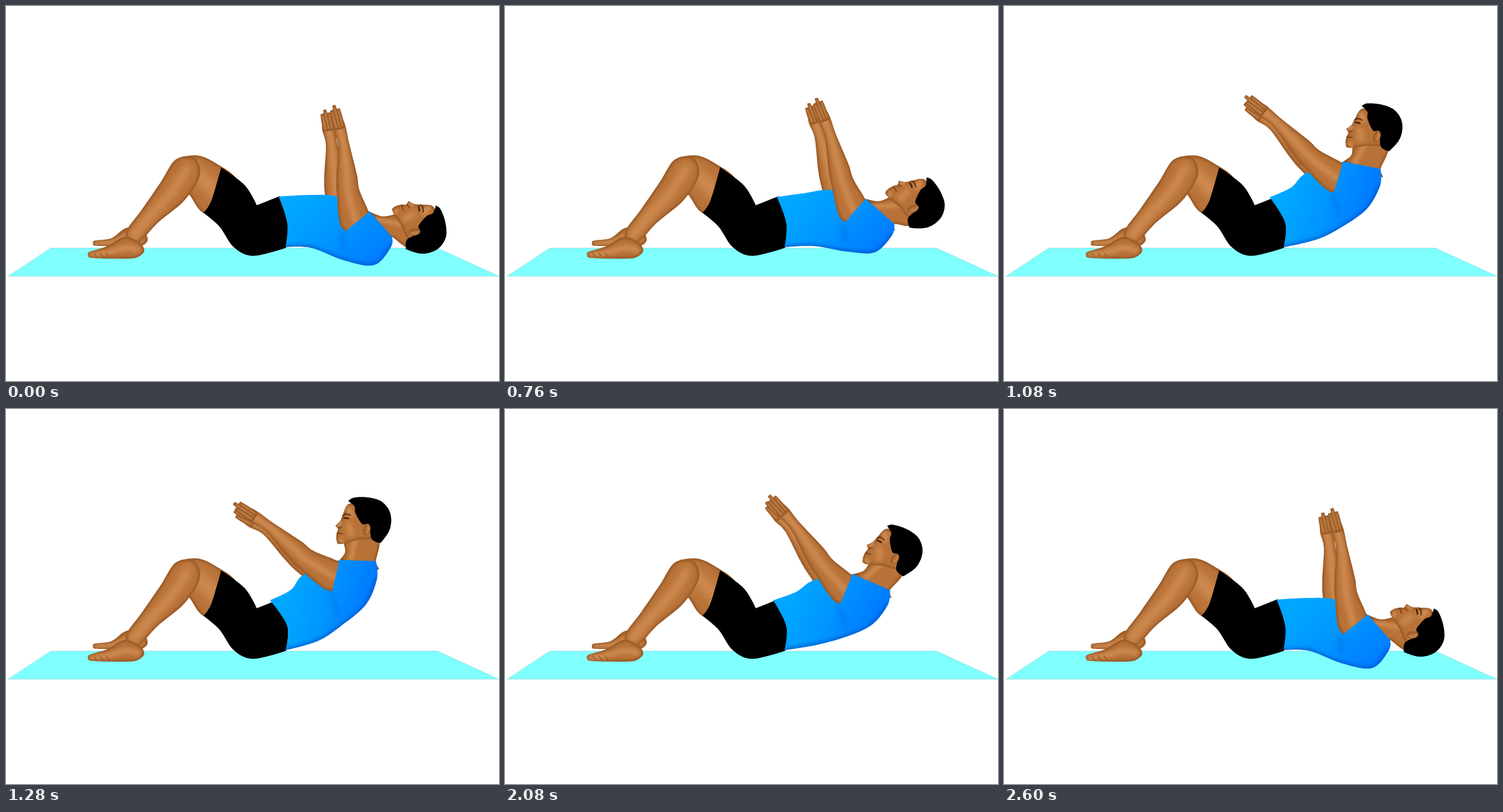
Recreate the animation shown at these times as an HTML page with a canvas. Size 857 px wide and 653 px high, loop 2.64 s.

```html
<!DOCTYPE html>
<html lang="en">
<head>
<meta charset="utf-8">
<title>Sit-up</title>
<style>
html, body { margin: 0; width: 100%; height: 100%; overflow: hidden; background: #fff; }
canvas { display: block; }
</style>
</head>
<body>
<canvas id="stage" width="857" height="653"></canvas>
<script>
const ctx = document.getElementById('stage').getContext('2d');
const LOOP = 2640, STEP = 40, MIDWAY = 0.536;
const SKIN = '#b87238', DARK = '#6e3a10', LIGHT = '#e6a66c';

// Joints: place when lying, midway and sitting
const JOINTS = {
  sleeve: [[585, 396], [583, 354], [566, 320]],
  shoulder: [[608, 378], [599, 328], [574, 294]],
  elbow: [[595, 325], [565, 283], [524, 264]],
  wrist: [[587, 242], [521, 208], [458, 206]],
  tip: [[570, 173], [480, 150], [396, 164]],
  ear: [[711, 393], [690, 281], [627, 209]],
  tilt: [[72], [28], [0]],
  waist: [[474, 332], [468, 333], [459, 333]],
  loin: [[530, 421], [545, 412], [542, 404]],
  back: [[588, 443], [600, 402], [582, 378]],
  blade: [[640, 451], [642, 387], [626, 340]],
  outer: [[669, 420], [670, 355], [645, 295]],
  nape: [[671, 402], [674, 332], [643, 265]],
  collar: [[632, 358], [611, 298], [580, 263]],
  chest: [[577, 332], [546, 302], [518, 288]],
  belly: [[528, 329], [510, 320], [495, 315]]
};

const mix = (a, b, f) => a.map((v, i) => v + (b[i] - v) * f);
const shift = (a, b) => [a[0] + b[0], a[1] + b[1]];

// Parabola through the three places
function along([a, b, c], p) {
  const wa = (p - MIDWAY) * (p - 1) / MIDWAY;
  const wb = p * (p - 1) / (MIDWAY * (MIDWAY - 1));
  const wc = p * (p - MIDWAY) / (1 - MIDWAY);
  return a.map((v, i) => v * wa + b[i] * wb + c[i] * wc);
}

function curve(pts, sharp = [], closed = true) {
  const n = pts.length, path = new Path2D();
  const at = i => closed ? pts[(i + n) % n] : pts[Math.max(0, Math.min(n - 1, i))];
  const slope = (i, k) => sharp.includes(i % n) ? 0 : (at(i + 1)[k] - at(i - 1)[k]) / 6;
  path.moveTo(...pts[0]);
  for (let i = 0; i < (closed ? n : n - 1); i++) {
    const a = at(i), b = at(i + 1);
    path.bezierCurveTo(a[0] + slope(i, 0), a[1] + slope(i, 1),
      b[0] - slope(i + 1, 0), b[1] - slope(i + 1, 1), b[0], b[1]);
  }
  if (closed) path.closePath();
  return path;
}
const thread = (...pts) => curve(pts, [], false);

function line(path, color, width, blur = 0, alpha = 1) {
  ctx.save();
  ctx.filter = blur ? `blur(${blur}px)` : 'none';
  ctx.globalAlpha = alpha;
  ctx.strokeStyle = color;
  ctx.lineWidth = width;
  ctx.lineCap = ctx.lineJoin = 'round';
  ctx.stroke(path);
  ctx.restore();
}

function fill(path, color) {
  ctx.fillStyle = color;
  ctx.fill(path);
}

// Skin with a dark rim and soft strokes, all kept inside the outline
function skin(path, ...shades) {
  fill(path, SKIN);
  ctx.save();
  ctx.clip(path);
  line(path, DARK, 4, 2.5, 0.7);
  for (const shade of shades) line(...shade);
  ctx.restore();
}

// Rounded limb along points [x, y, half width]
function limb(...pts) {
  const left = [], right = [], caps = [];
  pts.forEach(([x, y, r], i) => {
    const a = pts[Math.max(i - 1, 0)], b = pts[Math.min(i + 1, pts.length - 1)];
    const len = Math.hypot(b[0] - a[0], b[1] - a[1]);
    const dx = (b[0] - a[0]) / len * r, dy = (b[1] - a[1]) / len * r;
    left.push([x + dy, y - dx]);
    right.unshift([x - dy, y + dx]);
    if (i === 0) caps.push([x - dx * 0.8, y - dy * 0.8]);
    if (i === pts.length - 1) caps.push([x + dx * 0.8, y + dy * 0.8]);
  });
  const girth = pts.reduce((s, q) => s + q[2], 0) / pts.length;
  skin(curve([caps[0], ...left, caps[1], ...right]),
    [thread(...pts), LIGHT, girth * 0.6, girth * 0.3, 0.6]);
}

function mat() {
  const edge = new Path2D('M78 421.5L750 421.5L857 470.5L4 470.5Z');
  fill(edge, '#80ffff');
  line(edge, '#8fd0d0', 0.6);
}

function legs() {
  limb([236, 406, 13], [212, 401, 15], [185, 411, 7], [155, 413, 4.5]);
  limb([316, 282, 27], [343, 302, 36], [374, 333, 40]);
  limb([316, 281, 25], [290, 322, 26], [250, 366, 18], [221, 401, 15]);
  limb([230, 425, 13], [208, 421, 19], [178, 429, 11], [147, 433, 5.5]);
  for (let x = 152; x < 185; x += 11) line(thread([x, 430], [x + 5, 436]), DARK, 1.2, 0, 0.6);
  fill(curve([[374, 281], [415, 312], [436, 347], [476, 331], [490, 382], [487, 421], [430, 435],
    [396, 420], [371, 384], [343, 360], [357, 339]], [0, 2, 3, 5, 9]), '#000');
}

function arm(shoulder, elbow, wrist, tip) {
  const palm = mix(wrist, tip, 0.45);
  limb([...shoulder, 26], [...elbow, 20], [...mix(elbow, wrist, 0.35), 18], [...wrist, 10],
    [...palm, 11], [...mix(wrist, tip, 0.65), 8]);
  const len = Math.hypot(tip[0] - wrist[0], tip[1] - wrist[1]);
  const side = [(wrist[1] - tip[1]) / len, (tip[0] - wrist[0]) / len];
  for (let i = 1; i >= -1; i--) {
    const off = r => [side[0] * i * r, side[1] * i * r];
    const end = mix(wrist, tip, 0.96 - 0.1 * Math.abs(i));
    limb([...shift(palm, off(5)), 4.5], [...shift(end, off(6)), 3]);
  }
}

// Head in its own frame, with the ear at the centre
function head([x, y], tilt) {
  ctx.save();
  ctx.translate(x, y);
  ctx.rotate(tilt * Math.PI / 180);
  ctx.scale(0.97, 0.97);
  skin(curve([[-30, -46], [-43, -25], [-47, -15], [-56, -6], [-51, 0], [-54, 9], [-54, 20], [-48, 27],
    [-18, 20], [14, 12], [10, -35]], [3, 4]),
    [thread([-34, -37], [-27, -25]), LIGHT, 8, 3, 0.6],
    [thread([-46, -12], [-52, -6]), LIGHT, 4, 1.5, 0.7],
    [thread([-32, -8], [-27, 10]), LIGHT, 10, 4, 0.5],
    [thread([-48, 20], [-42, 23]), LIGHT, 5, 2, 0.6],
    [thread([-44, -24], [-37, -27], [-29, -25]), '#3c1c06', 2, 0.6, 0.8],
    [thread([-41, -20], [-33, -19]), '#281204', 2.5, 0.4, 0.9],
    [thread([-51, -1], [-44, -4]), DARK, 1.6, 0.6, 0.8],
    [thread([-53, 8], [-43, 8]), '#54270a', 1.5, 0.4, 0.8]);
  fill(curve([[-33, -50], [-24, -56], [0, -57], [24, -51], [39, -36], [44, -17], [40, 4], [25, 25],
    [9, 18], [4, -8], [-8, -9], [-20, -28], [-22, -41]], [0, 7]), '#000');
  const ear = new Path2D();
  ear.ellipse(0, 1, 6.5, 10.5, 0.25, 0, 7);
  skin(ear, [thread([2, -6], [4, 0], [0, 8]), LIGHT, 2.5, 1, 0.7]);
  ctx.restore();
}

// Point fixed to the head
function onHead([x, y], tilt, dx, dy) {
  const a = tilt * Math.PI / 180, c = Math.cos(a), s = Math.sin(a);
  return [x + dx * c - dy * s, y + dx * s + dy * c];
}

function draw(p) {
  const j = {};
  for (const name in JOINTS) j[name] = along(JOINTS[name], p);
  const reach = [j.shoulder, j.elbow, j.wrist, j.tip];
  const behind = mix([-21, -1], [-4, 5], p);

  fill(new Path2D('M0 0H857V653H0Z'), '#fff');
  mat();
  legs();
  arm(...reach.map((q, i) => shift(shift(q, behind), i === 3 ? [5, 9] : [0, 0])));

  const chin = onHead(j.ear, j.tilt[0], -40, 25), throat = onHead(j.ear, j.tilt[0], -28, 27);
  skin(curve([j.collar, mix(j.collar, throat, 0.5), chin, j.ear,
    onHead(j.ear, j.tilt[0], 22, 20), j.nape, mix(j.nape, j.outer, 0.5)], [0, 2]),
    [thread(mix(j.collar, j.nape, 0.3), mix(throat, j.ear, 0.3)), LIGHT, 6, 3, 0.6]);
  head(j.ear, j.tilt[0]);

  const blue = ctx.createLinearGradient(...j.belly, ...j.blade);
  blue.addColorStop(0, '#00a6ff');
  blue.addColorStop(0.5, '#0094ff');
  blue.addColorStop(1, '#007cff');
  const spine = [[486, 420], j.loin, j.back, j.blade, j.outer];
  const shirt = curve([j.waist, [489, 378], ...spine, j.nape, j.collar, j.chest, j.belly], [0, 2, 7, 8]);
  fill(shirt, blue);
  arm(...reach);
  fill(curve([j.sleeve, j.collar, j.nape, j.outer, j.blade], [0, 1, 2, 3, 4]), blue);

  ctx.save();
  ctx.clip(shirt);
  line(thread(...spine), '#0050c0', 6, 3, 0.8);
  line(thread(j.sleeve, mix(j.sleeve, j.back, 0.6)), '#0062dc', 5, 4, 0.6);
  ctx.restore();
}

const ease = u => (1 - Math.cos(Math.PI * Math.max(0, Math.min(1, u)))) / 2;
const pose = t => ease((t - 580) / 650) - ease((t - 1800) / 700);

let last = -1;
function tick() {
  const t = Math.floor(performance.now() % LOOP / STEP) * STEP;
  if (t !== last) draw(pose(last = t));
  requestAnimationFrame(tick);
}
tick();
</script>
</body>
</html>
```
